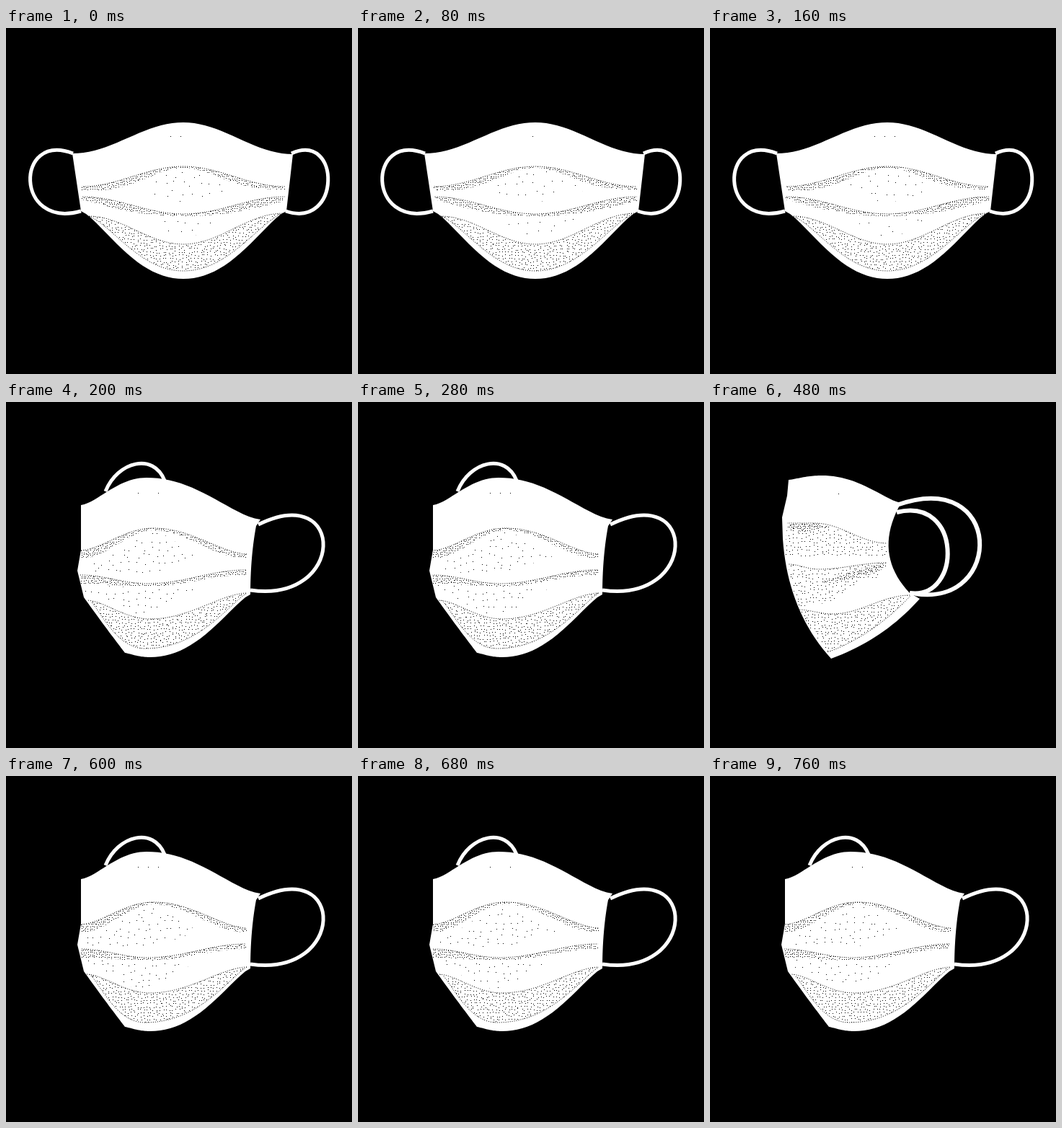
Animation, 480 px wide and 480 px high, one loop 0.8 s. Source, as an HTML page with a canvas:

```html
<!DOCTYPE html>
<html lang="en">
<head>
<meta charset="utf-8">
<title>Face mask turning</title>
<style>
  html, body { margin: 0; width: 100%; height: 100%; overflow: hidden; background: #000; }
  canvas { display: block; width: 480px; height: 480px; }
</style>
</head>
<body>
<canvas id="stage" width="480" height="480"></canvas>
<script>
const ctx = document.getElementById('stage').getContext('2d');
const STEP = 40, LOOP = 800, HOLD = 200, SAMPLES = 20;

const sample = fn => Array.from({ length: SAMPLES + 1 }, (_, i) => fn(i / SAMPLES));

// Cosine swell from both ends to the middle point; power < 1 makes it fuller.
function wave(left, mid, right, power = 1) {
  const half = end => sample(t => [
    end[0] + (mid[0] - end[0]) * t,
    end[1] + (mid[1] - end[1]) * (1 - Math.cos(Math.PI * t ** power)) / 2
  ]);
  return [...half(left), ...half(right).reverse()];
}

// Quadratic curve from a to b, pulled towards c.
const bow = (a, c, b) => sample(t => [0, 1].map(k =>
  (1 - t) ** 2 * a[k] + 2 * t * (1 - t) * c[k] + t * t * b[k]));

function trace(points) {
  const path = new Path2D();
  points.forEach(([x, y]) => path.lineTo(x, y));
  return path;
}

// Stippled cloth between two edges; gap is the dot spacing.
const band = (gap, top, bottom, ...lines) => ({
  gap,
  area: trace([...top, ...[...bottom].reverse()]),
  lines: lines.map(trace)
});

const fold = (gap, top, bottom) => band(gap, top, bottom, top);
const hem = (gap, top, bottom) => band(gap, top, bottom, top, bottom);

const front = {
  body: trace([
    ...wave([92, 174], [246, 131], [398, 175]),
    ...wave([104, 254], [246, 348], [389, 254], 0.68).reverse()
  ]),
  loops: ['M93 174C12 143 12 280 104 254', 'M396 174C465 143 465 280 388 254'],
  width: 5,
  bands: [
    fold(3, wave([105, 220], [246, 192], [387, 220]), wave([105, 226], [246, 194], [387, 224], 1.4)),
    fold(3, wave([105, 234], [246, 258], [387, 234]), wave([105, 238], [246, 261], [387, 240], 0.6)),
    hem(4.4, wave([114, 261], [246, 300], [385, 257]), wave([114, 261], [246, 337], [385, 257], 0.72)),
    band(13, wave([170, 223], [246, 196], [325, 223]), wave([170, 225], [246, 241], [325, 225])),
    band(15, wave([190, 264], [246, 267], [310, 263]), wave([190, 266], [246, 292], [310, 264]))
  ],
  specks: [228, 150]
};

const turned = {
  body: trace([
    ...wave([104, 143], [195, 105], [353, 163], 0.77),
    ...bow([347, 172], [339, 215], [339, 267]),
    ...wave([165, 348], [200, 354], [339, 267], 0.66).reverse(),
    ...bow([165, 348], [138, 313], [108, 271]),
    [99, 234], [104, 205]
  ]),
  loops: ['M138 124C155 82 205 70 220 109', 'M350 170C472 110 472 280 339 261'],
  width: 5,
  bands: [
    fold(3, wave([104, 206], [205, 175], [334, 211], 0.85), wave([104, 217], [205, 178], [334, 217])),
    fold(3, wave([103, 240], [197, 252], [333, 233]), wave([103, 252], [197, 256], [333, 240])),
    hem(4.4, wave([112, 275], [200, 301], [334, 265], 0.85), wave([118, 277], [193, 342], [334, 265], 0.6)),
    band(10, wave([112, 222], [205, 181], [275, 215]), wave([112, 236], [190, 238], [275, 217])),
    band(10, wave([110, 254], [200, 258], [275, 256]), wave([110, 265], [190, 295], [275, 258]))
  ],
  specks: [183, 126]
};

const side = {
  body: trace([
    ...wave([109, 108], [155, 102], [265, 140], 0.7),
    ...bow([265, 140], [225, 210], [277, 265]),
    ...bow([291, 273], [240, 330], [168, 356]),
    ...bow([168, 356], [108, 290], [101, 190]),
    [100, 160], [107, 130]
  ]),
  loops: ['M259 143C408 90 408 285 285 266', 'M259 153C350 130 350 275 277 265'],
  width: 6,
  bands: [
    fold(5.5, wave([107, 168], [145, 168], [246, 196]), wave([104, 214], [150, 214], [246, 213])),
    band(3, wave([108, 168], [140, 168], [175, 172]), wave([108, 175], [130, 180], [175, 172])),
    fold(5.5, wave([108, 225], [150, 232], [245, 223]), wave([121, 284], [150, 280], [230, 245])),
    band(3, bow([155, 251], [205, 229], [245, 223]), bow([155, 251], [215, 245], [245, 229])),
    hem(4.6, wave([121, 288], [170, 294], [278, 268]), bow([163, 347], [225, 325], [278, 269]))
  ],
  specks: [150, 127]
};

const views = [front, turned, side, turned];
for (const view of [front, turned, side]) view.loops = view.loops.map(d => new Path2D(d));

function random(seed) {
  return () => {
    seed = (seed + 0x6D2B79F5) | 0;
    let n = Math.imul(seed ^ (seed >>> 15), 1 | seed);
    n = (n + Math.imul(n ^ (n >>> 7), 61 | n)) ^ n;
    return ((n ^ (n >>> 14)) >>> 0) / 4294967296;
  };
}

function stipple({ gap, area }, rnd) {
  ctx.save();
  ctx.clip(area);
  const jitter = v => Math.floor(v + rnd() * gap * 0.7);
  for (let y = 160; y < 350; y += gap) {
    for (let x = 98; x < 392; x += gap) ctx.fillRect(jitter(x), jitter(y), 1, 1);
  }
  ctx.restore();
}

function draw(step) {
  const view = views[Math.floor(step * STEP / HOLD)];
  const rnd = random(step * 977 + 5);

  ctx.fillStyle = '#000';
  ctx.fillRect(0, 0, 480, 480);

  ctx.fillStyle = ctx.strokeStyle = '#fff';
  ctx.lineWidth = view.width;
  ctx.setLineDash([]);
  view.loops.forEach(path => ctx.stroke(path));
  ctx.fill(view.body);

  ctx.save();
  ctx.clip(view.body);
  ctx.fillStyle = ctx.strokeStyle = '#000';
  ctx.lineWidth = 1;
  ctx.setLineDash([1, 2]);
  for (const cloth of view.bands) {
    stipple(cloth, rnd);
    ctx.lineDashOffset = rnd() * 3;
    cloth.lines.forEach(path => ctx.stroke(path));
  }
  const [x, y] = view.specks;
  for (let i = 0; i < 3; i++) {
    if (rnd() < 0.6) ctx.fillRect(x + i * 14, y, 1, 1);
  }
  ctx.restore();
}

const start = performance.now();
let shown = -1;

function tick() {
  const step = Math.floor((performance.now() - start) % LOOP / STEP);
  if (step !== shown) draw(shown = step);
  requestAnimationFrame(tick);
}
tick();
</script>
</body>
</html>
```
